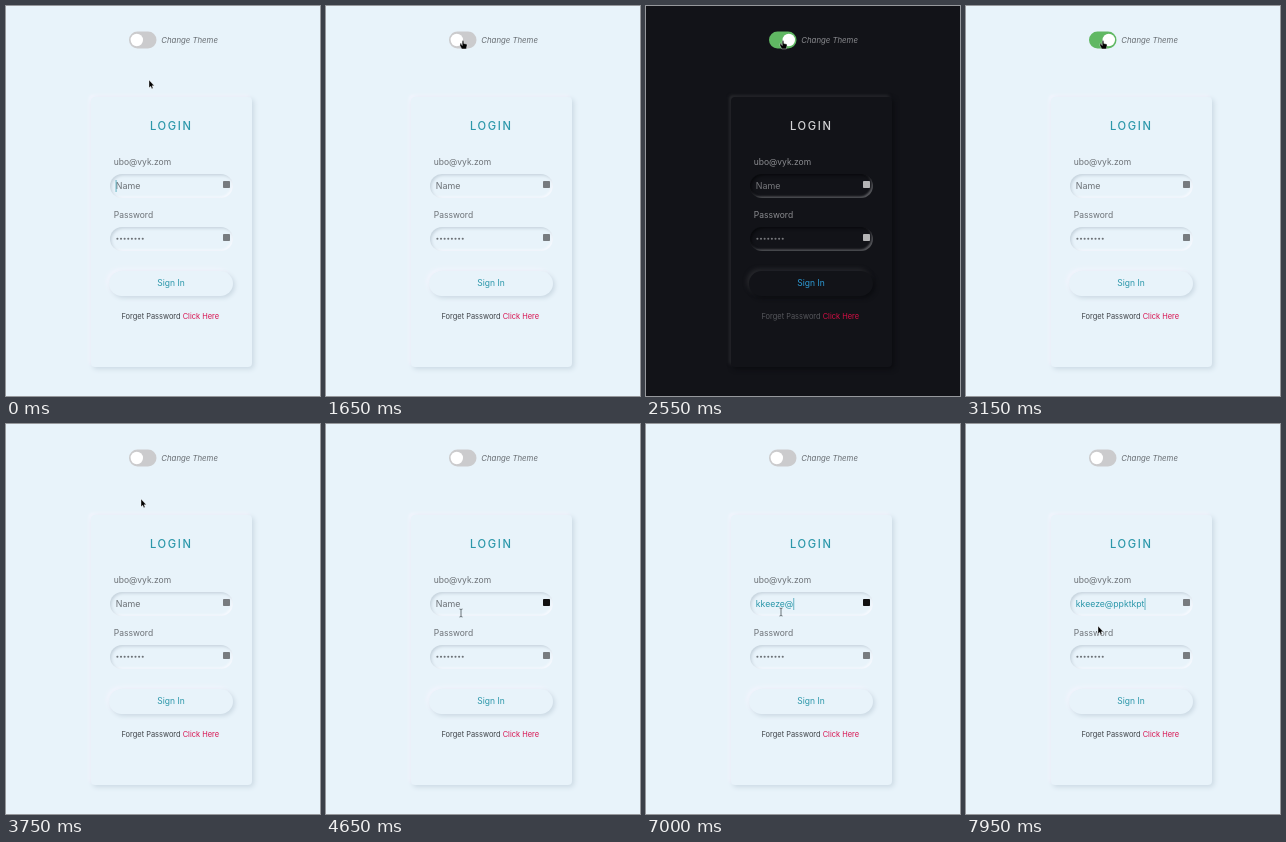
Write an HTML page that moves like this. It is 314 px wide and 390 px high and loops after 8 s.

```html
<!DOCTYPE html>
<html lang="en">
<head>
<meta charset="utf-8">
<title>Login</title>
<style>
  html, body { margin: 0; width: 100%; height: 100%; overflow: hidden; }
  #stage {
    position: relative; width: 314px; height: 390px; overflow: hidden;
    --bg: #e8f3fa; --title: #2b97aa; --label: #6c7176; --hint: #6c7176; --name: #666b70;
    --button: #2b97aa; --note: #3f4348; --link: #d8124f; --icon: #777b7f;
    --lit: #f3f5fd; --shade: #cbd9e3; --in-lit: #f6f9fe; --in-shade: #c6d3dd;
    background: var(--bg);
  }
  #stage.dark {
    --bg: #121318; --title: #d4d4d6; --label: #8b8c90; --hint: #77787c; --name: #8b8c90;
    --button: #2d9bd6; --note: #56575c; --link: #d60f45; --icon: #b4b4b6;
    --lit: #292a2e; --shade: #0b0c10; --in-lit: #58595d; --in-shade: #08090c;
  }
  #stage > * { position: absolute; box-sizing: border-box; }
  .card {
    left: 85px; top: 91px; width: 161px; height: 270px; border-radius: 4px; background: var(--bg);
    box-shadow: 2px 2px 5px var(--shade), -2px -2px 3px var(--lit);
  }
  .field {
    left: 104px; width: 123px; height: 24px; border-radius: 12px;
    box-shadow: inset 1.5px 1.5px 3px var(--in-shade), inset -1.5px -1.5px 2px var(--in-lit);
  }
  .button {
    left: 103px; top: 265px; width: 124px; height: 25px; border-radius: 12.5px; background: var(--bg);
    box-shadow: 2px 2px 4px var(--shade), -2px -2px 4px var(--lit);
  }
  svg { left: 0; top: 0; font-family: Inter, "Open Sans", sans-serif; }
</style>
</head>
<body>
<div id="stage">
  <div class="card"></div>
  <div class="field" style="top:168px"></div>
  <div class="field" style="top:221px"></div>
  <div class="button"></div>
  <svg width="314" height="390" viewBox="0 0 314 390">
    <rect id="track" x="123" y="25.5" width="27.5" height="17" rx="8.5"/>
    <circle id="knob" cy="34" r="6.2" fill="#fff"/>
    <text x="155.3" y="36.8" font-size="7.8" font-style="italic" fill="var(--name)">Change Theme</text>
    <text x="144" y="124" font-size="11.2" font-weight="500" letter-spacing="1.6" fill="var(--title)">LOGIN</text>
    <g font-size="8.5" fill="var(--label)">
      <text x="107.8" y="158.7">ubo@vyk.zom</text>
      <text x="107.8" y="211.7">Password</text>
    </g>
    <text id="hint" x="109.8" y="182.7" font-size="8.9" fill="var(--hint)">Name</text>
    <text id="typed" x="109.8" y="182.7" font-size="8.7" fill="var(--title)"></text>
    <rect id="caret" y="174" width=".7" height="12" fill="var(--title)"/>
    <path d="M111.4 232.8H137.5" stroke="var(--hint)" stroke-width="2.1" stroke-linecap="round" stroke-dasharray="0 3.62"/>
    <rect id="icon" x="217" y="175" width="7" height="7" rx=".8"/>
    <rect x="217" y="228" width="7" height="7" rx=".8" fill="var(--icon)"/>
    <text x="165" y="280.2" font-size="8.5" text-anchor="middle" fill="var(--button)">Sign In</text>
    <text x="115.5" y="313.2" font-size="7.45" fill="var(--note)">Forget Password <tspan fill="var(--link)">Click Here</tspan></text>
    <g id="pointer">
      <path id="arrow" d="M0 0V7.8L1.7 6.3 2.8 8.8 4.1 8.2 3 5.8H5.3Z" fill="#000" stroke="#fff" stroke-width=".4"/>
      <path id="hand" d="M-.8 .5Q0-.4 .8 .5V3L3.4 3.6Q4.2 4 4 5L3.3 8.4H-1.2L-3 5.2Q-3-.0 -.8 5Z" fill="#000" stroke="#fff" stroke-width=".4"/>
      <path id="beam" d="M-1.5-4Q0-4 0-3Q0-4 1.5-4M0-3V3M-1.5 4Q0 4 0 3Q0 4 1.5 4" fill="none" stroke="#4b5358" stroke-width=".8"/>
    </g>
  </svg>
</div>
<script>
const LOOP = 8000, DARK = 2100, LIGHT = 3150, SLIDE = 400;
const TEXT = "kkeeze@ppktkpt";
const KEYS = [5450, 5650, 5700, 5900, 5950, 6050, 6950, 7250, 7650, 7700, 7750, 7850, 7900, 7950];

// Pointer stops: time, x, y
const PATH = [
  [0, 143, 74], [1030, 143, 74], [1250, 145, 62], [1650, 137, 34.5],
  [3450, 137, 34.5], [3750, 135, 75], [3950, 137, 40], [4200, 136, 90],
  [4450, 133, 200], [4650, 135, 189], [4830, 135, 189], [4950, 135, 188],
  [7750, 135, 188], [7950, 132, 202], [LOOP, 132, 202]
];

const $ = id => document.getElementById(id);
const [stage, track, knob, hint, typed, caret, icon, pointer] =
  ["stage", "track", "knob", "hint", "typed", "caret", "icon", "pointer"].map($);
const clamp = v => Math.min(1, Math.max(0, v));
const mix = (a, b, k) => a + (b - a) * k;
const show = (el, on) => { el.style.visibility = on ? "visible" : "hidden"; };

// CSS "ease": cubic-bezier(.25, .1, .25, 1)
function ease(x) {
  let lo = 0, hi = 1;
  const bez = (a, b, s) => 3 * a * s * (1 - s) ** 2 + 3 * b * s * s * (1 - s) + s ** 3;
  for (let i = 0; i < 20; i++) {
    const mid = (lo + hi) / 2;
    if (bez(.25, .25, mid) < x) lo = mid; else hi = mid;
  }
  return bez(.1, 1, lo);
}

function pointerAt(t) {
  const i = PATH.findIndex(p => p[0] > t);
  const [t0, x0, y0] = PATH[i - 1], [t1, x1, y1] = PATH[i];
  const u = (t - t0) / (t1 - t0), k = u * u * (3 - 2 * u);
  return [mix(x0, x1, k), mix(y0, y1, k)];
}

function caretOn(t, count) {
  if (t < 1700) return t < 50 || (t >= 850 && t < 1350);
  if (t < 4850) return false;
  const start = count ? KEYS[count - 1] : 4950;
  return t < start || (t - start) % 1000 < 530;
}

function draw(t) {
  stage.classList.toggle("dark", t >= DARK && t < LIGHT);

  const on = ease(clamp((t - DARK) / SLIDE)) - ease(clamp((t - LIGHT) / SLIDE));
  knob.setAttribute("cx", mix(130.8, 142.8, on));
  track.setAttribute("fill", `rgb(${mix(203, 96, on)},${mix(203, 184, on)},${mix(205, 99, on)})`);

  const count = KEYS.filter(k => k <= t).length;
  typed.textContent = TEXT.slice(0, count);
  show(hint, !count);
  show(caret, caretOn(t, count));
  caret.setAttribute("x", 109.7 + (count ? typed.getComputedTextLength() + .3 : 0));

  const [x, y] = pointerAt(t);
  const overField = y > 168 && y < 192;
  const overSwitch = y > 25 && y < 43;
  pointer.setAttribute("transform", `translate(${x} ${y})`);
  show($("beam"), overField);
  show($("hand"), overSwitch);
  show($("arrow"), !overField && !overSwitch);
  icon.setAttribute("fill", overField ? "#111" : "var(--icon)");
}

const begin = performance.now();
function tick() {
  draw((performance.now() - begin) % LOOP);
  requestAnimationFrame(tick);
}
tick();
</script>
</body>
</html>
```
